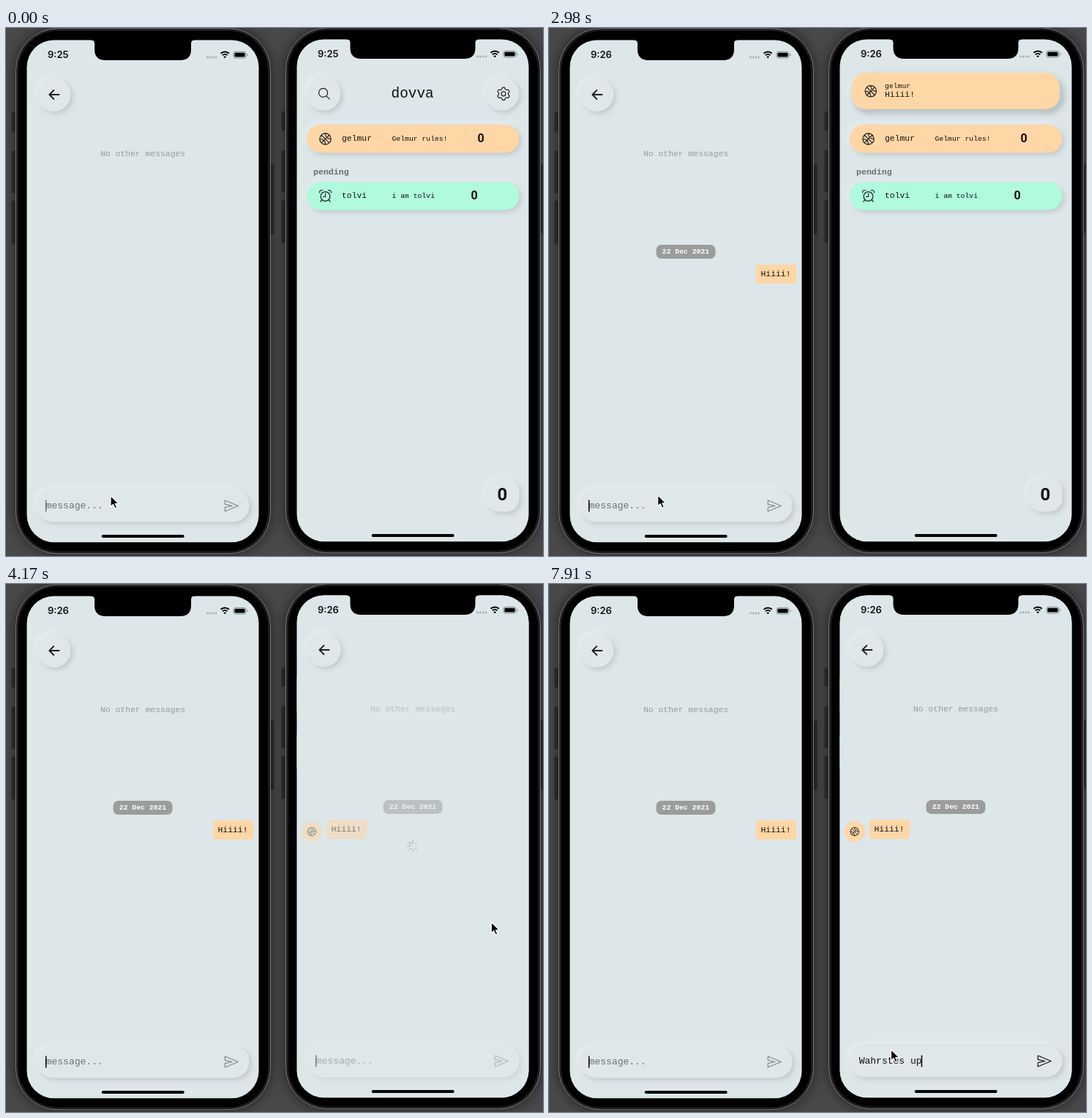
Recreate the animation shown at these times as an HTML page. Size 734 by 721 pixels, loop 8 s.

```html
<!DOCTYPE html>
<html lang="en">
<head>
<meta charset="utf-8">
<title>Chat demo</title>
<style>
html, body { margin: 0; width: 100%; height: 100%; overflow: hidden; background: #494949; }
svg { display: block; width: 734px; height: 721px; }
text { font-family: "Liberation Mono", "Courier New", monospace; white-space: pre; fill: #111; }
.num { font-family: Roboto, sans-serif; font-weight: 700; text-anchor: middle; }
.clock { font: 600 13px Inter, sans-serif; }
.line { fill: none; stroke: #1c2022; stroke-width: 1.2; stroke-linecap: round; stroke-linejoin: round; }
.soft { fill: #dfe7e9; filter: drop-shadow(3px 3px 3px #bfc8ca) drop-shadow(-4px -4px 3px #e6edef); }
.row { filter: drop-shadow(3px 3px 3px #c0c9cb) drop-shadow(-3px -3px 3px #e5ecee); }
.raised { filter: drop-shadow(4px 5px 5px #b4bec1); }
.sheet { fill: #dde6e8; filter: drop-shadow(-2px 0 4px #0004); }
.body { filter: drop-shadow(0 0 9px #0008); }
</style>
</head>
<body>
<svg id="stage" viewBox="0 0 734 721"></svg>
<script>
const PEACH = '#ffd6a5', MINT = '#b0fadd', SCREEN = '#dde6e8';
const CHAR = 7.8; // advance of the 13px input font
const RIGHT = 'translate(369 -1)';

const text = (x, y, size, str, attrs = '') =>
  `<text x="${x}" y="${y}" font-size="${size}" ${attrs}>${str}</text>`;
const box = (x, y, w, h, r, attrs = '') =>
  `<rect x="${x}" y="${y}" width="${w}" height="${h}" rx="${r}" ${attrs}/>`;
const group = (attrs, ...parts) => `<g ${attrs}>${parts.join('')}</g>`;
const line = (d, attrs = '') => `<path class="line" d="${d}" ${attrs}/>`;
const knob = (x, y) => `<circle class="soft" cx="${x}" cy="${y}" r="23"/>`;
const screen = attrs => box(28.5, 16.4, 317, 685.8, 37, attrs);

const ball = (x, y, scale = 1) => group(
  `transform="translate(${x} ${y}) rotate(-45) scale(${scale})"`,
  line('M-7.7 0a7.7 7.7 0 1 0 15.4 0a7.7 7.7 0 1 0-15.4 0M-7.7 0H7.7M0-7.7V7.7M-5.4-5.4Q0 0-5.4 5.4M5.4-5.4Q0 0 5.4 5.4'));

const alarm = (x, y) => group(`transform="translate(${x} ${y})"`,
  line('M-6.4 1a6.4 6.4 0 1 0 12.8 0a6.4 6.4 0 1 0-12.8 0M0-3V1.5H-3M-7.8-4.2Q-8.4-8-4-7.4M7.8-4.2Q8.4-8 4-7.4M-4.8 5.8L-6.6 8M4.8 5.8L6.6 8'));

function gear(x, y) {
  const pts = Array.from({ length: 72 }, (_, i) => {
    const a = i * Math.PI / 36;
    const r = 7.6 + Math.max(-1, Math.min(1, 2 * Math.cos(6 * a)));
    return `${(x + r * Math.sin(a)).toFixed(1)} ${(y - r * Math.cos(a)).toFixed(1)}`;
  });
  return line(`M${pts.join('L')}ZM${x - 3} ${y}a3 3 0 1 0 6 0a3 3 0 1 0-6 0`);
}

const phoneBody = attrs => group(attrs,
  [[8, 115, 26], [8, 168, 57], [8, 236, 58], [362, 187, 94]]
    .map(([x, y, h]) => box(x, y, 4, h, 1.5, 'fill="#303030" stroke="#222" stroke-width=".6"')).join(''),
  box(13.5, .8, 348, 717, 57, 'class="body" fill="#1d1d1d" stroke="#777"'),
  box(17, 4, 341, 710.5, 54),
  screen(`fill="${SCREEN}"`));

function phoneTop(attrs, half, drop) {
  const l = 187 - half, r = 187 + half;
  return group(attrs,
    `<path d="M${l - 5} 15V16.4Q${l} 16.4 ${l} 21V${drop - 15}Q${l} ${drop} ${l + 15} ${drop}H${r - 15}Q${r} ${drop} ${r} ${drop - 15}V21Q${r} 16.4 ${r + 5} 16.4V15Z"/>`,
    '<text class="clock" x="57" y="41.3"></text>',
    [0, 1, 2, 3].map(i => `<circle cx="${275.5 + i * 3.8}" cy="40" r="1.4" fill="#a9b0b2"/>`).join(''),
    '<path d="M293.6 34.8a8 8 0 0 1 11.2 0M295.9 37.3a4.8 4.8 0 0 1 6.6 0" fill="none" stroke="#000" stroke-width="2"/><path d="M297.3 39.2L299.2 41.2L301.1 39.2Q299.2 37.8 297.3 39.2Z"/>',
    box(311, 32.4, 17, 8.6, 2.6, 'fill="none" stroke="#858c8e"'),
    box(312.4, 33.8, 14.2, 5.8, 1.4),
    '<path d="M329.4 35v3.4q1.2-.4 1.2-1.7t-1.2-1.7" fill="#858c8e"/>',
    box(130.7, 692, 113, 4, 2));
}

const backButton = knob(65.5, 91) +
  line('M72.5 91H59.5M65.3 85L59.3 91L65.3 97', 'style="stroke-width:1.8"');

const messages = (id, x) => group(`id="${id}"`,
  box(146.5, 296, 81, 19, 7, 'fill="#9b9d9d"'),
  text(154.8, 308.2, 9.75, '22 Dec 2021', 'font-weight="700" style="fill:#fff"'),
  box(x, 323, 55, 26, 4, `fill="${PEACH}"`),
  text(x + 6.5, 339, 11.4, 'Hiiii!'));

const input = id => group(`id="${id}"`,
  box(42, 630, 290.5, 44.5, 22, 'class="soft"'),
  text(54.7, 655.5, 13, ''),
  box(54, 644.5, 1.5, 16, 0),
  line('M299.3 645L317.3 652.5L299.3 660V654.6L309 652.5L299.3 650.4Z'));

const empty = text(129, 174.5, 11.4, 'No other messages', 'style="fill:#959c9e"');

const row = (y, color, icon, name, note, count, cx) => group('',
  box(411, y, 290.5, 38.5, 19.2, `class="row" fill="${color}"`), icon,
  text(459, y + 22.2, 11.4, name), text(527.5, y + 21.8, 9.75, note),
  text(cx, y + 23.7, 16, count, 'class="num"'));

const home = group('id="home"',
  knob(434.5, 89.8),
  line('M427.6 88.4a6 6 0 1 0 12 0a6 6 0 1 0-12 0M438 92.8L442.3 97.2'),
  text(526.5, 94.8, 19.4, 'dovva'),
  knob(678, 89.8), gear(680, 89.8),
  row(132, PEACH, ball(436.5, 151.5), 'gelmur', 'Gelmur rules!', 0, 649),
  text(420, 199.5, 11.6, 'pending', 'font-weight="700" style="fill:#686f71"'),
  row(210, MINT, alarm(436.5, 229), 'tolvi', 'i am tolvi', 0, 640),
  box(655.5, 614.5, 46, 46, 18, 'class="soft"'),
  text(678.3, 645, 24, 0, 'class="num"'));

const spinner = group('id="spinner"', Array.from({ length: 8 }, (_, i) =>
  `<path d="M0-4V-7.4" stroke="#7d8486" stroke-width="1.8" stroke-linecap="round" opacity="${.25 + i * .09}" transform="rotate(${i * 45})"/>`).join(''));

const page = group('id="page"',
  box(28.5, 10, 330, 700, 0, 'class="sheet"'), backButton, spinner,
  group('id="content"', empty, messages('received', 69),
    `<circle cx="49" cy="339.2" r="14" fill="${PEACH}"/>`, ball(48.7, 339.2, .74), input('rightInput')));

const notice = group('id="notice"',
  box(414, 67, 284, 49.5, 19, `class="raised" fill="${PEACH}"`), ball(439.8, 92),
  text(459, 87.7, 9.75, 'gelmur'), text(459, 100.2, 11.4, 'Hiiii!'));

const $ = id => document.getElementById(id);
$('stage').innerHTML =
  `<defs><clipPath id="clipL">${screen()}</clipPath>
   <clipPath id="clipR">${screen(`transform="${RIGHT}"`)}</clipPath></defs>` +
  '<rect width="734" height="721" fill="#494949"/>' +
  phoneBody('') + phoneBody(`transform="${RIGHT}"`) +
  group('clip-path="url(#clipL)"', backButton, empty, messages('sent', 283), input('leftInput')) +
  group('clip-path="url(#clipR)"', home, group(`transform="${RIGHT}"`, page), notice) +
  phoneTop('', 66, 44) + phoneTop(`transform="${RIGHT}"`, 85.5, 43) +
  '<path id="cursor" d="M0 0V15.2L3.5 12L6 17.6L8.6 16.4L6.2 11H11Z" stroke="#fff" stroke-width="1.2" stroke-linejoin="round"/>';

const clamp = v => Math.max(0, Math.min(1, v));
const ramp = (t, start, length) => clamp((t - start) / length);
const easeOut = p => 1 - (1 - p) ** 3;
const move = (id, x, y, extra = '') => $(id).setAttribute('transform', `translate(${x} ${y})${extra}`);
const fade = (id, v) => $(id).setAttribute('opacity', v);

// [time, text] pairs
const leftKeys = [[0, ''], [1050, 'H'], [1200, 'Hi'], [1500, 'Hii'], [1650, 'Hiii'],
  [1790, 'Hiiii'], [2090, 'Hiiii!'], [2540, '']];
const rightKeys = [[0, ''], [4910, 'W'], [5210, 'Wa'], [5360, 'Wah'], [5660, 'Waht'], [5810, 'Wahta'],
  [5960, 'Wahtat'], [6110, 'Wahtats'], [6260, 'Wahrstes '], [6710, 'Wahrstes u'], [7760, 'Wahrstes up']];
const latest = (keys, t) => keys.findLast(k => k[0] <= t);

// [time, x, y] of the pointer tip
const path = [[0, 143, 638.5], [150, 143, 638.5], [600, 148.7, 637.8], [3100, 148.7, 637.8], [3570, 523.5, 80],
  [3880, 523.5, 80], [4170, 663.3, 461.5], [4700, 467.5, 635.5], [8000, 467.5, 635.5]];
function pointer(t) {
  const i = path.findIndex(p => p[0] > t);
  const [a, b] = [path[i - 1], path[i]];
  const p = ramp(t, a[0], b[0] - a[0]), s = p * p * (3 - 2 * p);
  return [a[1] + (b[1] - a[1]) * s, a[2] + (b[2] - a[2]) * s];
}

function blink(t) {
  const p = ((t - 6810) % 1040 + 1040) % 1040;
  return p < 765 ? 1 - ramp(p, 490, 150) : ramp(p, 890, 150);
}

function drawInput(id, str, caret) {
  const [, label, bar, icon] = $(id).children;
  label.textContent = str || 'message...';
  label.style.fill = str ? '#111' : '#6b7274';
  bar.setAttribute('x', 53.9 + CHAR * str.length);
  bar.setAttribute('opacity', caret);
  icon.style.stroke = str ? '#111' : '#82898b';
}

function draw() {
  const t = performance.now() % 8000;
  document.querySelectorAll('.clock').forEach(c => c.textContent = t < 900 ? '9:25' : '9:26');

  const leftCaret = t < 900 ? blink(t + 95) : t < 2540 ? 1 : blink(t);
  drawInput('leftInput', latest(leftKeys, t)[1], leftCaret);
  const [keyTime, typed] = latest(rightKeys, t);
  drawInput('rightInput', typed, typed ? 1 - ramp(t, keyTime + 560, 170) : 1);
  fade('sent', t < 2540 ? 0 : 1);

  const push = easeOut(ramp(t, 3712, 500));
  move('home', -106 * push, 0);
  move('page', t < 3712 ? 340 : 316 * (1 - push), 0);
  const loaded = ramp(t, 4090, 160);
  fade('content', loaded);
  fade('spinner', 1 - loaded);
  move('spinner', 187, 359.2, ` rotate(${Math.floor(t / 100) * 45})`);

  const shown = easeOut(ramp(t, 2690, 460)) - ramp(t, 3890, 230) ** 2;
  move('notice', 0, -115 * (1 - shown));
  move('cursor', ...pointer(t));
  requestAnimationFrame(draw);
}
draw();
</script>
</body>
</html>
```
